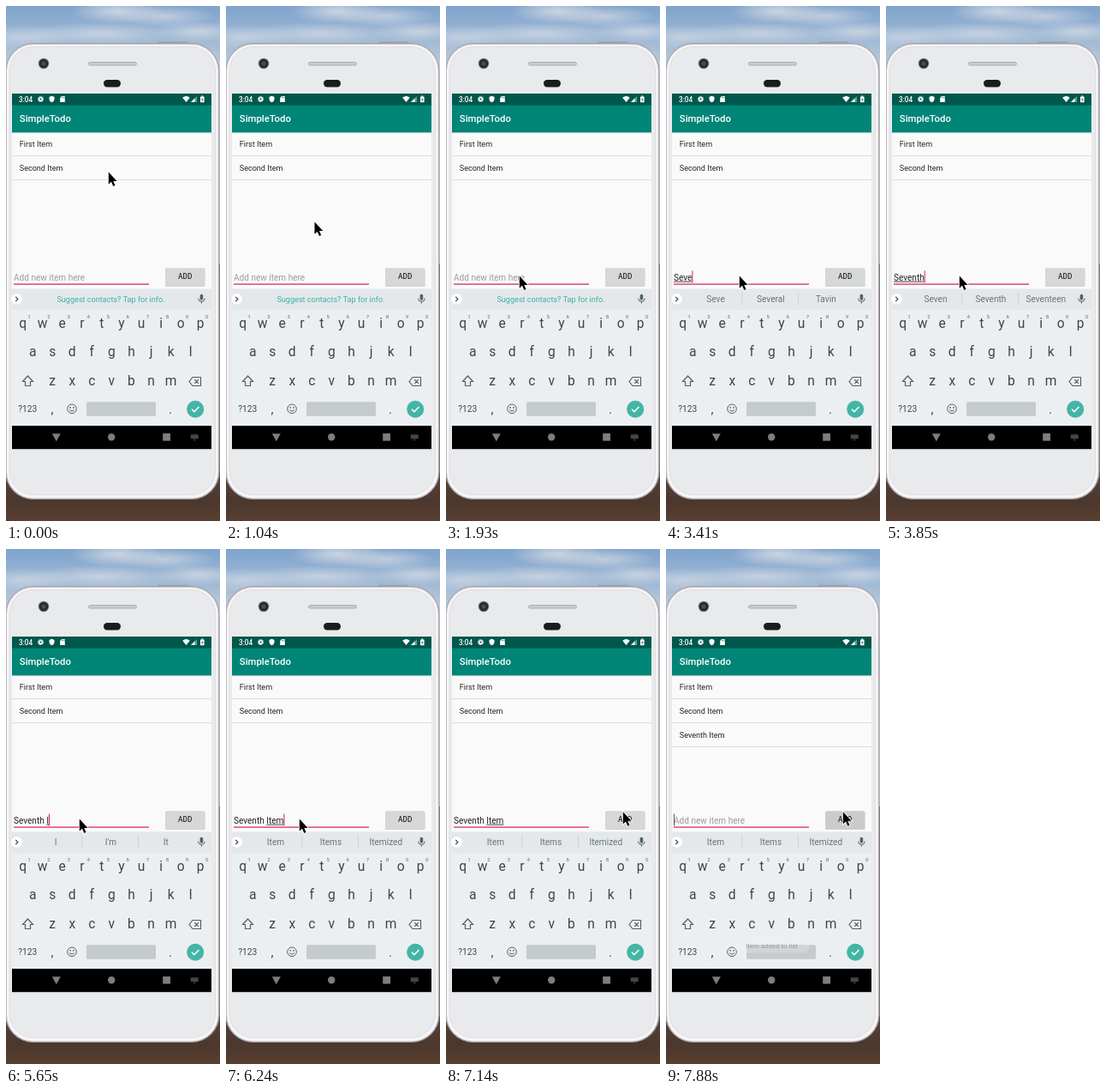
Write an HTML page with a canvas that moves like this. It is 250x600 px and loops after 8 s.

```html
<!DOCTYPE html>
<html lang="en">
<head>
<meta charset="utf-8">
<title>Todo list demo</title>
<style>
html, body { margin: 0; width: 100%; height: 100%; overflow: hidden; background: #43301f; }
canvas { display: block; width: 250px; height: 600px; }
</style>
</head>
<body>
<canvas id="stage"></canvas>
<script>
const LOOP = 8000, W = 250, H = 600;
const canvas = document.getElementById('stage');
const ctx = canvas.getContext('2d');
const dpr = window.devicePixelRatio || 1;
canvas.width = W * dpr;
canvas.height = H * dpr;

// time -> state tracks; each value holds until the next key
const typing = [
  [0, ''], [2520, 'S'], [3110, 'Se'], [3410, 'Seve'], [3560, 'Seven'],
  [3700, 'Sevent'], [3850, 'Seventh'], [4000, 'Seventh '], [5500, 'Seventh I'],
  [5940, 'Seventh It'], [6090, 'Seventh Ite'], [6240, 'Seventh Item'], [7730, '']
];
const strips = [
  [0, null], [3410, ['Seve', 'Several', 'Tavin']], [3560, ['Seven', 'Seventh', 'Seventeen']],
  [4000, ['day', 'grade', 'I']], [5650, ['I', "I'm", 'It']], [6240, ['Item', 'Items', 'Itemized']]
];
const caret = [
  [0, 0], [450, 1], [1040, 0], [1480, 1], [1930, 0], [2370, 1], [2970, 0], [3110, 1],
  [4450, 0], [4900, 1], [6690, 0], [7290, 1], [7580, 0], [7730, 1]
];
const START = [119.8, 193.5], FIELD = [85.8, 314.5], BUTTON = [206.8, 306.3];
const mix = (a, b, p) => a.map((v, i) => v + (b[i] - v) * p);
const pointer = [
  [0, START], [890, mix(START, FIELD, .14)], [1040, mix(START, FIELD, .48)],
  [1180, mix(START, FIELD, .82)], [1330, mix(START, FIELD, 1.02)], [1480, FIELD],
  [6690, mix(FIELD, BUTTON, .15)], [6840, mix(FIELD, BUTTON, .55)],
  [6990, mix(FIELD, BUTTON, .93)], [7140, BUTTON]
];

function at(track, t) {
  let value = track[0][1];
  for (const [time, v] of track) if (t >= time) value = v;
  return value;
}

function rect(x, y, w, h, fill) {
  ctx.fillStyle = fill;
  ctx.fillRect(x, y, w, h);
}

function round(x, y, w, h, r, fill, stroke, lw = 1) {
  ctx.beginPath();
  ctx.roundRect(x, y, w, h, r);
  if (fill) { ctx.fillStyle = fill; ctx.fill(); }
  if (stroke) { ctx.strokeStyle = stroke; ctx.lineWidth = lw; ctx.stroke(); }
}

function dot(x, y, r, fill) {
  ctx.beginPath();
  ctx.arc(x, y, r, 0, Math.PI * 2);
  ctx.fillStyle = fill;
  ctx.fill();
}

function shape(d, x, y, fill, stroke, lw = 1) {
  const p = new Path2D(d);
  ctx.save();
  ctx.translate(x, y);
  if (stroke) { ctx.strokeStyle = stroke; ctx.lineWidth = lw; ctx.stroke(p); }
  if (fill) { ctx.fillStyle = fill; ctx.fill(p); }
  ctx.restore();
}

function text(s, x, y, size, fill, align = 'left', weight = 400) {
  ctx.font = `${weight} ${size}px Roboto, sans-serif`;
  ctx.textAlign = align;
  ctx.fillStyle = fill;
  ctx.fillText(s, x, y);
}

function gradient(x0, y0, x1, y1, ...colors) {
  const g = ctx.createLinearGradient(x0, y0, x1, y1);
  colors.forEach((c, i) => g.addColorStop(i / (colors.length - 1), c));
  return g;
}

function cloud(x, y, rx, ry, alpha) {
  ctx.save();
  ctx.translate(x, y);
  ctx.scale(rx, ry);
  const g = ctx.createRadialGradient(0, 0, 0, 0, 0, 1);
  g.addColorStop(0, `rgba(222,224,229,${alpha})`);
  g.addColorStop(1, 'rgba(222,224,229,0)');
  dot(0, 0, 1, g);
  ctx.restore();
}

function scenery() {
  rect(0, 0, W, 300, gradient(0, 0, 0, 75, '#7fa3cc', '#9db8d6', '#c3cdd9'));
  cloud(130, 6, 55, 15, .8);
  cloud(185, 12, 60, 13, .65);
  cloud(225, 30, 55, 12, .7);
  cloud(110, 32, 90, 13, .65);
  cloud(20, 36, 60, 14, .6);
  rect(0, 300, W, 300, gradient(0, 550, 0, 600, '#57443b', '#4b372d', '#573e2f'));
}

function phone() {
  rect(178, 41.8, 34, 2, '#9c9ca2');
  round(-.3, 43.5, 249.3, 531, 32, '#c3c3c8', '#a3a3a9');
  round(1, 45, 246.7, 528.3, 30.5, '#f7f5f7');
  round(4, 47.5, 240.5, 522, 28, '#e9eaec', '#dadadd', .8);
  dot(44, 67, 6.3, '#777b7e');
  dot(44, 67, 5.3, '#272a2d');
  dot(44, 67, 2.5, '#454c55');
  round(96.5, 65.5, 56, 3.6, 1.8, '#c9cccf', '#a1a4a7', .8);
  round(114, 86, 20, 8.5, 4.2, '#1b1c1d');
}

function statusBar() {
  rect(7, 102, 233, 13.6, '#00574b');
  text('3:04', 15, 111.5, 8.2, '#fff', 'left', 500);
  ctx.save();
  ctx.setLineDash([1.2, 1.03]);
  ctx.beginPath();
  ctx.arc(40.5, 108.5, 2.9, 0, Math.PI * 2);
  ctx.strokeStyle = '#fff';
  ctx.lineWidth = 1.2;
  ctx.stroke();
  ctx.restore();
  dot(40.5, 108.5, 2.6, '#fff');
  dot(40.5, 108.5, 1.1, '#00574b');
  shape('M0-3.7L3-2.4V0Q3 2.6 0 3.8Q-3 2.6-3 0V-2.4Z', 53.5, 108.5, '#fff');
  shape('M-1-3.5H2.8V3.5H-2.8V-1.6Z', 66, 108.5, '#fff');
  for (const x of [65.2, 66.5, 67.8]) rect(x, 105.8, .6, 1.5, '#00574b');
  shape('M0 3.5L-4.3-1.7Q0-5.3 4.3-1.7Z', 210.5, 108.5, '#fff');
  shape('M3.5 3.5H-3.5L3.5-3.5Z', 219.5, 108.5, 'rgba(255,255,255,.4)');
  shape('M1 3.5H-3.5L1-1Z', 219.5, 108.5, '#fff');
  round(227, 105.5, 4.6, 6.8, .6, '#fff');
  rect(228.4, 104.5, 1.8, 1.2, '#fff');
  shape('M.5-2.2L-1.3.5H0L-.4 2.2L1.3-.5H0Z', 229.3, 109, '#00574b');
}

function app(t) {
  rect(7, 102, 233, 231, '#fafafa');
  rect(7, 147, 233, 2, gradient(0, 147, 0, 149, '#cfd3d3', '#fafafa'));
  rect(7, 102, 233, 45.3, '#008577');
  text('SimpleTodo', 15.8, 135, 11.35, '#fff', 'left', 500);
  const items = ['First Item', 'Second Item'];
  if (t >= 7730) items.push('Seventh Item');
  items.forEach((s, i) => {
    text(s, 15.8, 163.8 + 28 * i, 9.05, '#252525');
    rect(7, 174 + 28 * i, 233, 1, '#dcdcdc');
  });
}

function field(t) {
  const s = at(typing, t), size = 10.05, x = 9, base = 319.5;
  text(s || 'Add new item here', x, base, size, s ? '#222' : '#9b9b9b');
  const end = x + (s ? ctx.measureText(s).width : 0);
  const from = x + ctx.measureText(s.slice(0, s.lastIndexOf(' ') + 1)).width;
  if (s && from < end) rect(from, 320.7, end - from, .9, '#333');
  rect(9, 323.5, 158, 1.2, '#d81b60');
  if (at(caret, t)) rect(end, 308.5, 1, 14, s ? '#d81b60' : '#555');
}

function button(t) {
  const pressed = t >= 7290;
  round(186, 305.8, 46.5, 21.2, 1.5, '#cdcfcf');
  round(186.3, 305.2, 46, 21, 1.5, pressed ? '#cacccc' : '#d6d7d7');
  text('ADD', 209.2, 318.4, 8.3, '#2b2b2b', 'center', 500);
}

function strip(t) {
  const words = at(strips, t);
  rect(7, 329.5, 233, 25, '#e4e8eb');
  dot(12.5, 341.5, 6.2, '#fff');
  shape('M-1.3-2.6L1.3 0L-1.3 2.6', 12.5, 341.5, null, '#37474f', 1.2);
  if (words) {
    words.forEach((s, i) => text(s, 58 + 64.4 * i, 345, 10.1, '#67757c', 'center'));
    rect(88.5, 334, .8, 14, '#c8ced1');
    rect(154, 334, .8, 14, '#c8ced1');
  } else {
    text('Suggest contacts? Tap for info.', 122.5, 344.8, 9.1, '#3bb3a2', 'center');
  }
  round(226.6, 335.8, 3.6, 7, 1.8, '#526067');
  shape('M-3.8 0A3.8 3.8 0 0 0 3.8 0M0 3.8V6', 228.4, 340.6, null, '#526067', 1);
}

function keyboard() {
  const ink = '#37474f', pitch = 23.07, mid = 123.4;
  rect(7, 354, 233, 135, '#eceff1');
  [['qwertyuiop', 374.8], ['asdfghjkl', 408.4], ['zxcvbnm', 441.9]].forEach(([keys, y]) => {
    const left = mid - pitch * (keys.length - 1) / 2;
    [...keys].forEach((k, i) => text(k, left + pitch * i, y, 15.6, ink, 'center'));
  });
  for (let i = 0; i < 10; i++)
    text((i + 1) % 10, 27 + pitch * i, 364, 6.2, '#5f6d74', 'center');

  shape('M0-6L6 .5H3V5.5H-3V.5H-6Z', 25.5, 437, null, '#526067', 1.2);
  shape('M-7 0L-3-5H6.5V5H-3ZM-.7-2.3L3.9 2.3M3.9-2.3L-.7 2.3', 221, 437.5, null, '#526067', 1.2);

  text('?123', 25.3, 473.2, 10.2, ink, 'center');
  text(',', 54, 474.5, 15, ink, 'center');
  text('.', 192, 474.5, 15, ink, 'center');
  shape('M5.3 0A5.3 5.3 0 1 1-5.3 0A5.3 5.3 0 1 1 5.3 0M-2.8 1.4Q0 4.2 2.8 1.4', 77, 469.3, null, '#526067', 1);
  dot(75.1, 467.8, .9, '#526067');
  dot(78.9, 467.8, .9, '#526067');
  round(94, 461.2, 81, 16.6, 1.5, '#c5cacd');
  dot(221.2, 469.8, 10, '#43b5a6');
  shape('M-4.2 0L-1.3 2.9L4.3-2.8', 221.2, 469.8, null, '#fff', 1.6);
}

function navBar() {
  const grey = '#7d7d7d';
  rect(7, 489, 233, 27.2, '#000');
  shape('M-5-4H5L0 5Z', 58.8, 502.3, grey);
  dot(123.2, 502.3, 4.2, grey);
  rect(183.2, 498, 8.8, 8.6, grey);
  rect(215.8, 499.3, 8.8, 4.6, '#555');
  for (let r = 0; r < 2; r++)
    for (let i = 0; i < 4; i++) rect(216.6 + 2 * i, 500.2 + 1.6 * r, .9, .7, '#000');
  shape('M-1.8 0H1.8L0 1.8Z', 220.2, 504.8, '#555');
}

function toast() {
  round(79, 452, 89, 18.5, 9, 'rgba(238,238,238,.3)');
  text('Item added to list', 123.5, 464.5, 7.9, 'rgba(60,60,60,.38)', 'center');
}

function draw(t) {
  ctx.setTransform(dpr, 0, 0, dpr, 0, 0);
  scenery();
  phone();
  app(t);
  statusBar();
  field(t);
  button(t);
  strip(t);
  keyboard();
  navBar();
  if (t >= 7880) toast();
  const [x, y] = at(pointer, t);
  shape('M0 0V14.2L3.2 11.3L5.5 16.4L7.7 15.4L5.5 10.4H9.8Z', x, y, '#000', '#fff', 1.6);
}

function frame(now) {
  draw(now % LOOP);
  requestAnimationFrame(frame);
}
draw(0);
requestAnimationFrame(frame);
</script>
</body>
</html>
```
